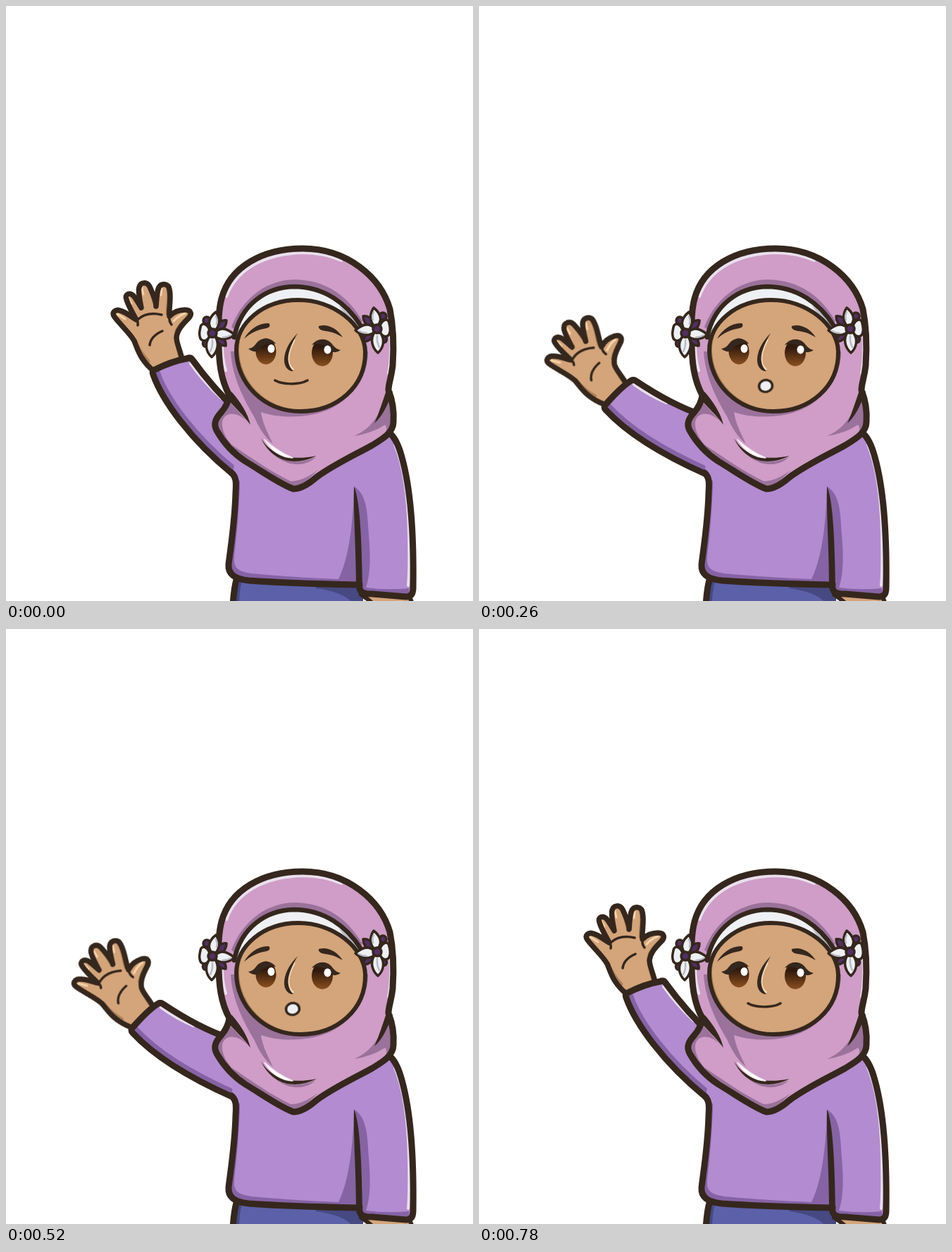
Recreate the animation shown at these times as an HTML page. Size 663 px wide and 844 px high, loop 0.91 s.

```html
<!DOCTYPE html>
<html lang="en">
<head>
<meta charset="utf-8">
<title>Waving girl</title>
<style>
html, body { margin: 0; width: 100%; height: 100%; overflow: hidden; background: #fff; }
svg { display: block; width: 663px; height: 844px; }
:root { --ink: #35271d; --pink: #cf9dc7; --plum: #9a729b; --lilac: #b38bd0; --grape: #8663a5; --skin: #d4a47a; --tan: #ad8159; --white: #eef0f3; }
path, ellipse, circle { stroke-linecap: round; stroke-linejoin: round; }
.line { fill: none; stroke: var(--ink); stroke-width: 9; }
.thin { fill: none; stroke: var(--ink); stroke-width: 3.5; }
.ink { fill: var(--ink); }
.pink { fill: var(--pink); }
.plum { fill: var(--plum); }
.lilac { fill: var(--lilac); }
.grape { fill: var(--grape); }
.skin { fill: var(--skin); }
.tan { fill: var(--tan); }
.edge { fill: none; stroke: var(--grape); stroke-width: 21; }
.shine { fill: none; stroke: #e9e0ed; stroke-width: 4; }
.warm { fill: none; stroke: #f6d3aa; stroke-width: 3; }
.petal { fill: var(--white); stroke: var(--ink); stroke-width: 3.5; }
.leaf { fill: #513064; stroke: var(--ink); stroke-width: 3.5; }
.teeth { fill: var(--white); stroke: var(--ink); stroke-width: 3.5; }

.high, .mid, .low, .oh, .grin, .hand, .reach { animation: 910ms step-end infinite; }
.high { animation-name: high; }
.mid { animation-name: mid; }
.low { animation-name: low; }
.oh { animation-name: oh; }
.grin { animation-name: grin; }
.hand { animation-name: wave; transform-origin: 202px 414px; }
.reach { animation-name: reach; transform-origin: 322px 664px; }
@keyframes high { 0%, 85.7142% { opacity: 1 } 14.2857%, 100% { opacity: 0 } }
@keyframes mid { 0%, 28.5714%, 85.7142%, 100% { opacity: 0 } 14.2857%, 71.4285% { opacity: 1 } }
@keyframes low { 0%, 71.4285%, 100% { opacity: 0 } 28.5714% { opacity: 1 } }
@keyframes oh { 0%, 42.8571%, 71.4285%, 100% { opacity: 0 } 28.5714%, 57.1428% { opacity: 1 } }
@keyframes grin { 0%, 57.1428%, 100% { opacity: 0 } 42.8571% { opacity: 1 } }
@keyframes wave {
  0%, 85.7142%, 100% { transform: none }
  14.2857%, 71.4285% { transform: translate(-31px, 24.5px) rotate(-9.1deg) }
  28.5714%, 57.1428% { transform: translate(-64.5px, 53.5px) rotate(-17.4deg) }
  42.8571% { transform: translate(-63px, 54px) rotate(-18.4deg) }
}
@keyframes reach { 0%, 57.1428%, 100% { transform: none } 42.8571% { transform: scale(.985) } }
</style>
</head>
<body>
<svg viewBox="0 0 663 844">
<defs>
  <path id="palm" d="M211,519C190,502 187,487 182,475C176,464 163,453 154,441C149,434 156,430 162,432C170,434 178,441 185,445C180,436 173,424 171,416C168,408 176,406 181,411C185,416 189,423 192,428C190,417 187,404 189,399C191,391 200,391 204,398C209,409 213,419 213,426C214,415 214,405 217,399C221,392 231,394 232,402C235,413 231,428 232,440C239,433 246,431 254,431C264,431 264,438 259,443C250,452 243,460 242,470C242,480 248,488 251,506"/>
  <path id="armHigh" d="M334,580C308,556 285,530 264,501Q262,498 257,500C240,503 225,509 211,516Q207,518 209,523C222,560 262,615 322,664"/>
  <path id="armMid" d="M326,577C298,561 268,542 244,516Q241,513 237,515C223,521 207,533 197,543Q193,546 196,551C220,585 265,620 322,664"/>
  <path id="armLow" d="M316,580C280,568 250,550 223,532Q219,529 215,532C201,541 190,554 180,565Q176,569 180,573C205,600 250,632 322,664"/>
  <path id="scarf" d="M408,685C390,679 365,661 340,646C320,633 308,618 299,602C294,592 298,585 305,577C313,568 316,560 317,552C305,530 302,505 302,475C301,450 302,430 306,415C318,370 364,344 421,344C485,344 532,385 545,430C550,455 551,480 549,510C547,528 543,535 543,545C549,560 551,575 550,590C550,605 535,614 520,623C495,637 466,650 440,669C425,682 415,685 408,685Z"/>
  <path id="face" d="M327,488C327,450 365,417 415,417C465,417 509,452 510,490C511,540 470,575 418,575C366,575 327,535 327,488Z"/>
  <path id="torso" d="M322,664C327,670 327,676 326,690C325,730 320,760 316,792C315,806 325,813 345,815C400,819 450,820 500,821C500,832 508,834 520,834L568,838C576,838 578,832 578,825C579,760 576,690 562,640C558,625 552,612 545,606L345,575L314,590Z"/>
  <clipPath id="inPalm"><use href="#palm"/></clipPath>
  <clipPath id="inHigh"><use href="#armHigh"/></clipPath>
  <clipPath id="inMid"><use href="#armMid"/></clipPath>
  <clipPath id="inLow"><use href="#armLow"/></clipPath>
  <clipPath id="inScarf"><use href="#scarf"/></clipPath>
  <clipPath id="inFace"><use href="#face"/></clipPath>
  <clipPath id="inTorso"><use href="#torso"/></clipPath>
  <linearGradient id="iris" x1="0" y1="0" x2="0" y2="1">
    <stop offset=".3" stop-color="#30190d"/><stop offset="1" stop-color="#8b4f1e"/>
  </linearGradient>
  <g id="flower">
    <path class="leaf" d="M4,-5C6,-15 13,-19 20,-18C20,-11 17,-6 10,-3ZM5,4C16,6 20,11 19,18C12,18 6,14 5,4Z"/>
    <circle class="leaf" cx="-8" cy="-18" r="5"/>
    <circle class="leaf" cx="-9" cy="15" r="4.500"/>
    <path class="petal" d="M-4,4C-8,14 -17,12 -18,4C-19,0 -18,-4 -17,-8C-16,-16 -7,-14 -4,-4Z"/>
    <path class="petal" d="M-1,-5C-8,-13 -4,-23 5,-30C11,-21 11,-11 4,-4Z"/>
    <path class="petal" d="M5,-2C13,-10 23,-5 31,2C24,9 12,11 5,5Z"/>
    <path class="petal" d="M4,5C10,14 8,26 -1,34C-10,26 -11,14 -4,5Z"/>
    <path d="M-3,26Q1,18 0,10M15,6Q21,6 26,3M6,-13Q8,-18 5,-24" fill="none" stroke="#b9b9c4" stroke-width="2.5"/>
    <circle class="leaf" r="6"/>
  </g>
</defs>

<!-- trousers and lowered hand -->
<path d="M326,812C323,825 322,835 322,850H507V815Z" fill="#5c60a8"/>
<path d="M326,812C323,825 322,835 322,850H331Q331,828 336,812ZM440,818L507,818V850H494Q484,832 440,826Z" fill="#464982"/>
<path class="line" d="M327,814C324,825 323,835 322,850"/>
<path class="skin" d="M512,834L516,850H577L574,836Z"/>
<path class="line" style="stroke-width:6" d="M504,835Q512,840 519,846M573,838L577,848"/>

<!-- raised hand -->
<g class="hand">
  <g clip-path="url(#inPalm)">
    <use href="#palm" class="tan"/>
    <use href="#palm" class="skin" x="-5" y="-1"/>
    <path class="skin" d="M187,448L228,442L240,462L243,505H210L188,474Z"/>
    <path class="warm" d="M158,437L169,444M174,414L178,422M193,400L195,409M221,401L220,410M254,436Q244,440 238,447"/>
    <path fill="none" stroke="var(--tan)" stroke-width="5" d="M183,474Q190,491 202,504"/>
  </g>
  <use href="#palm" class="line" style="stroke-width:7.5"/>
  <path class="thin" d="M185,445Q188,448 187,453M188,444C196,437 208,435 221,438M204,481C205,472 213,465 222,461M232,440Q231,447 235,452"/>
</g>

<!-- sweater -->
<g clip-path="url(#inTorso)">
  <use href="#torso" class="lilac"/>
  <path class="grape" d="M320,660L332,674C331,720 327,755 324,782C322,801 335,804 360,806C410,810 445,812 472,813C486,785 492,740 494,690L502,825L320,820Z"/>
  <path class="grape" d="M495,682C513,694 513,720 515,750C518,785 517,808 511,825Q540,829 572,826V840H500Z"/>
  <path class="shine" d="M552,622C566,655 571,700 572,750Q573,800 571,822"/>
</g>
<g class="high">
  <g clip-path="url(#inHigh)">
    <use href="#armHigh" class="lilac"/>
    <path class="edge" d="M209,523C222,560 262,615 322,664"/>
    <path class="shine" d="M262,507C274,524 288,540 305,556"/>
  </g>
  <use href="#armHigh" class="line"/>
</g>
<g class="mid">
  <g clip-path="url(#inMid)">
    <use href="#armMid" class="lilac"/>
    <path class="edge" d="M196,551C220,585 265,620 322,664"/>
    <path class="shine" d="M241,521Q262,542 285,555"/>
  </g>
  <use href="#armMid" class="line"/>
</g>
<g class="low"><g class="reach">
  <g clip-path="url(#inLow)">
    <use href="#armLow" class="lilac"/>
    <path class="edge" d="M180,573C205,600 250,632 322,664"/>
    <path class="shine" d="M220,537Q242,553 266,563"/>
  </g>
  <use href="#armLow" class="line"/>
</g></g>
<path class="line" d="M320,662C327,668 327,676 326,690C325,730 320,760 316,792C315,806 325,813 345,815C400,819 450,820 500,821"/>
<path class="line" d="M502,820C500,832 508,834 520,834L568,838C576,838 578,832 578,825C579,760 576,690 562,640C558,625 552,612 545,606"/>
<path class="ink" d="M494,681C502,700 505,750 506,826L497,824C497,770 493,720 494,681Z"/>

<!-- scarf -->
<g clip-path="url(#inScarf)">
  <use href="#scarf" class="pink"/>
  <path class="plum" d="M320,455C337,412 372,388 411,388C455,389 486,412 506,447L495,455L330,465Z"/>
  <path class="plum" d="M319,490C321,525 336,555 352,582C360,600 368,612 379,621C370,603 364,590 362,576C390,586 435,585 463,570C495,553 514,522 514,490Z"/>
  <path class="plum" d="M316,560L346,593Q329,574 314,580C302,586 306,606 320,622C350,642 375,660 404,674Q420,675 443,658L408,692L285,610Z"/>
  <path class="plum" d="M494,610C515,601 529,586 546,543L560,595L530,622Q545,600 538,594Q520,606 494,610Z"/>
  <path class="plum" d="M364,615C375,639 402,656 440,640C422,657 386,655 364,615Z"/>
  <path class="shine" d="M313,412C327,374 365,352 421,350Q450,350 476,361M307,482Q307,500 312,517M545,455Q548,495 543,522"/>
</g>
<use href="#scarf" class="line"/>
<path class="ink" d="M313,545L321,548C333,562 343,577 347,594C337,580 325,570 314,557ZM541,542L549,547C540,570 534,582 523,592C530,576 535,560 541,542Z"/>
<path class="ink" d="M362,613C378,640 408,645 441,638C412,653 378,648 362,613Z"/>
<path d="M367,615C378,633 391,640 407,641C391,634 379,626 367,615Z" fill="#fff" stroke="#f3ebf2" stroke-width="1.5"/>

<!-- cap and face -->
<path d="M324,470C333,423 370,399 408,398C452,398 484,422 504,454L490,460H340Z" fill="var(--white)"/>
<path d="M472,424Q492,439 501,456L484,441ZM326,468Q338,443 362,428L348,448Z" fill="#b9bbc7"/>
<path class="line" style="stroke-width:6.5" d="M324,470C333,423 370,399 408,398C452,398 484,422 504,454"/>
<g clip-path="url(#inFace)">
  <use href="#face" class="tan"/>
  <use href="#face" class="skin" x="4" y="-2"/>
</g>
<use href="#face" class="line" style="stroke-width:6"/>
<use href="#flower" transform="translate(293 464)"/>
<use href="#flower" transform="translate(527 458) scale(-1 1)"/>

<!-- features -->
<path class="ink" d="M338,472C345,459 359,449 373,450C376,453 374,456 370,457C357,459 347,464 338,472ZM444,454C456,450 470,457 478,470C470,465 463,462 453,461C446,460 443,457 444,454Z"/>
<g fill="url(#iris)">
  <ellipse cx="369" cy="490" rx="14.5" ry="18.5"/>
  <ellipse cx="449" cy="492" rx="15" ry="19"/>
</g>
<path class="ink" d="M344,486Q350,486 355,479C362,470 375,469 383,479C374,477 363,480 357,490Q349,491 344,486ZM475,488Q469,487 464,481C457,470 442,470 434,481C443,477 455,480 461,490Q469,493 475,488Z"/>
<ellipse cx="376.5" cy="486" rx="5" ry="6" fill="#fff"/>
<ellipse cx="456.5" cy="487.500" rx="5" ry="6" fill="#fff"/>
<path d="M409,474C402,487 400,496 401,504Q402,511 407,515" fill="none" stroke="#f6dcb9" stroke-width="3"/>
<path class="ink" d="M414,464C404,481 399,495 401,505Q402,512 408,518C399,518 395,510 395,502C395,491 401,477 414,464Z"/>

<!-- mouths -->
<path class="high thin" d="M382,531C392,537 416,538 428,531"/>
<path class="mid teeth" d="M389,533Q408,530 427,533C424,541 417,544 408,544C399,545 392,542 389,533Z"/>
<path class="grin teeth" d="M391,532Q408,530 424,532C422,541 416,546 408,546C399,546 393,541 391,532Z"/>
<ellipse class="oh teeth" cx="407" cy="539" rx="9.500" ry="8.500" transform="rotate(-12 407 539)"/>
</svg>
</body>
</html>
```
